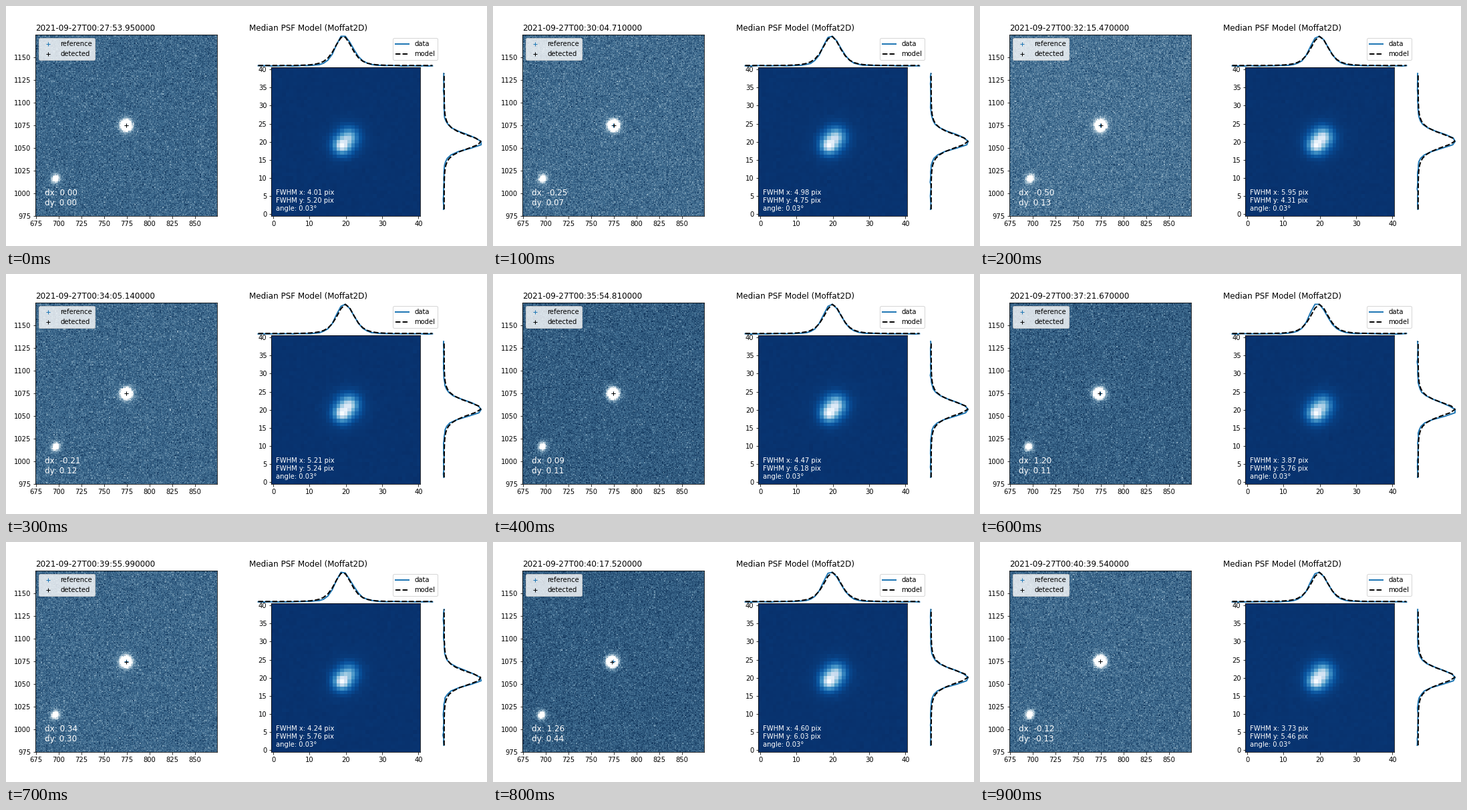
A matplotlib script for the animation above (1000 ms loop, 720x360 px).

```python
import numpy as np
import matplotlib.pyplot as plt
from matplotlib.animation import FuncAnimation
from matplotlib.colors import LinearSegmentedColormap

W, H, DPI = 720, 360, 72
FRAMES, INTERVAL = 10, 100
plt.rcParams.update({"font.family": "DejaVu Sans", "font.size": 10})

# Measurements per exposure, interpolated in between
KEYS = [0, 2, 4, 6, 7, 8, 9]
SERIES = {
    "time": [1673.95, 1935.47, 2154.81, 2241.67, 2395.99, 2417.52, 2439.54],
    "dx": [0, -0.50, 0.09, 1.20, 0.34, 1.26, -0.12],
    "dy": [0, 0.13, 0.11, 0.11, 0.30, 0.44, -0.13],
    "fwhm_x": [4.01, 5.95, 4.47, 3.87, 4.24, 4.60, 3.73],
    "fwhm_y": [5.20, 4.31, 6.18, 5.76, 5.76, 6.03, 5.46],
    "sky": [0.27, 0.33, 0.22, 0.23, 0.28, 0.21, 0.28],
    "lobe": [0.58, 0.90, 0.86, 0.58, 0.48, 0.72, 0.80],
    "shift": [-0.25, 0.05, 0.08, 0.20, -0.25, 0.12, 0.08],
}
REF = np.array([774.5, 1074.5])
COMPANION = np.array([-77.7, -58.7])
SKY = LinearSegmentedColormap.from_list("sky", [
    (0, "#12365c"), (0.3, "#3e6b8f"), (0.6, "#91b0c4"), (1, "white")])


def state(i):
    return {name: np.interp(i, KEYS, vals) for name, vals in SERIES.items()}


def moffat(x, y, x0, y0, a, stretch=1.0):
    """Round profile, optionally stretched along a direction near 60 degrees."""
    c, s = 0.5, np.sqrt(0.75)
    u = (c * (x - x0) + s * (y - y0)) / stretch
    v = (c * (y - y0) - s * (x - x0)) * stretch
    return (1 + (u**2 + v**2) / a**2) ** -3


def field(i, st):
    rng = np.random.default_rng(100 + i)
    x, y = np.meshgrid(np.arange(675, 875), np.arange(975, 1175))
    img = st["sky"] + rng.normal(0, 0.095, x.shape)
    main = REF - (st["dx"], st["dy"])
    img += 9 * moffat(x, y, *main, 5.6)
    img += 1.8 * moffat(x, y, *(main + COMPANION), 5.6, 1.08)
    return img


def psf(i, st):
    rng = np.random.default_rng(200 + i)
    x, y = np.meshgrid(PIX, PIX)
    img = moffat(x, y, 19.0, 19.0, 3.2)
    img += st["lobe"] * moffat(x, y, 20.9, 21.3, 3.8)
    img /= img.max()
    return img + rng.normal(0, 0.004, img.shape)


def unit(profile):
    profile = profile - np.median(np.r_[profile[:6], profile[-6:]])
    return profile / profile.max()


def model(profile, shift):
    """Single Moffat with the centroid and area of the profile."""
    core = np.clip(profile - 0.1, 0, None)
    centre = (core * PIX).sum() / core.sum() + shift
    a = 0.75 * profile.sum()
    return 0.012 + 0.985 * (1 + ((PIX - centre) / a) ** 2) ** -2.5


def add_axes(left, top, right, bottom):
    return fig.add_axes([left / W, 1 - bottom / H,
                         (right - left) / W, (bottom - top) / H])


PIX = np.arange(41)
fig = plt.figure(figsize=(W / DPI, H / DPI), dpi=DPI, facecolor="white")

ax_field = add_axes(44.2, 43.2, 316.2, 315.2)
field_im = ax_field.imshow(np.zeros((200, 200)), cmap=SKY, vmin=0, vmax=1,
                           origin="lower", aspect="auto",
                           interpolation="nearest",
                           extent=(674.5, 874.5, 974.5, 1174.5))
ax_field.set_xticks(range(675, 851, 25))
ax_field.set_yticks(range(975, 1151, 25))
ax_field.plot(*REF, "+", color="C0", label="reference")
detected, = ax_field.plot(*REF, "+", color="k", label="detected")
ax_field.legend(loc="upper left")
stamp = ax_field.set_title("", loc="left", fontsize=12)
offsets = ax_field.text(0.05, 0.05, "", color="white", fontsize=12,
                        va="bottom", transform=ax_field.transAxes)

ax_psf = add_axes(397.4, 92.4, 620.2, 315.2)
psf_im = ax_psf.imshow(np.zeros((41, 41)), cmap="Blues_r", origin="lower",
                       aspect="auto", interpolation="nearest")
ax_psf.set_xticks(range(0, 41, 10))
ax_psf.set_yticks(range(0, 41, 5))
widths = ax_psf.text(0.03, 0.03, "", color="white", va="bottom",
                     transform=ax_psf.transAxes)

ax_top = add_axes(364.5, 43.2, 651.4, 92)
ax_side = add_axes(652.3, 91, 714, 315.2)
for ax in (ax_top, ax_side):
    ax.axis("off")
top_data, = ax_top.plot([], [], color="C0", lw=2, label="data")
top_model, = ax_top.plot([], [], "k--", lw=2, label="model")
side_data, = ax_side.plot([], [], color="C0", lw=2)
side_model, = ax_side.plot([], [], "k--", lw=2)
ax_top.set(xlim=(-2, 42), ylim=(-0.05, 1.05))
ax_side.set(xlim=(-0.05, 1.05), ylim=(-2, 42))
ax_top.legend(loc="upper right")
ax_top.set_title("Median PSF Model (Moffat2D)", loc="left", fontsize=12)


def update(i):
    st = state(i)
    minutes, seconds = divmod(round(st["time"], 2), 60)
    stamp.set_text(f"2021-09-27T00:{int(minutes):02d}:{seconds:05.2f}0000")
    field_im.set_data(field(i, st))
    detected.set_data([REF[0] - st["dx"]], [REF[1] - st["dy"]])
    offsets.set_text(f"dx: {st['dx']:.2f}\ndy: {st['dy']:.2f}")

    img = psf(i, st)
    psf_im.set_data(img)
    psf_im.set_clim(img.min(), img.max())
    widths.set_text(f"FWHM x: {st['fwhm_x']:.2f} pix\n"
                    f"FWHM y: {st['fwhm_y']:.2f} pix\nangle: 0.03°")
    across, up = unit(img.sum(axis=0)), unit(img.sum(axis=1))
    top_data.set_data(PIX, across)
    top_model.set_data(PIX, model(across, st["shift"]))
    side_data.set_data(up, PIX)
    side_model.set_data(model(up, st["shift"] / 2), PIX)
    return ()


anim = FuncAnimation(fig, update, frames=FRAMES, interval=INTERVAL,
                     init_func=lambda: update(0), repeat=True, repeat_delay=0)
plt.show()
```
